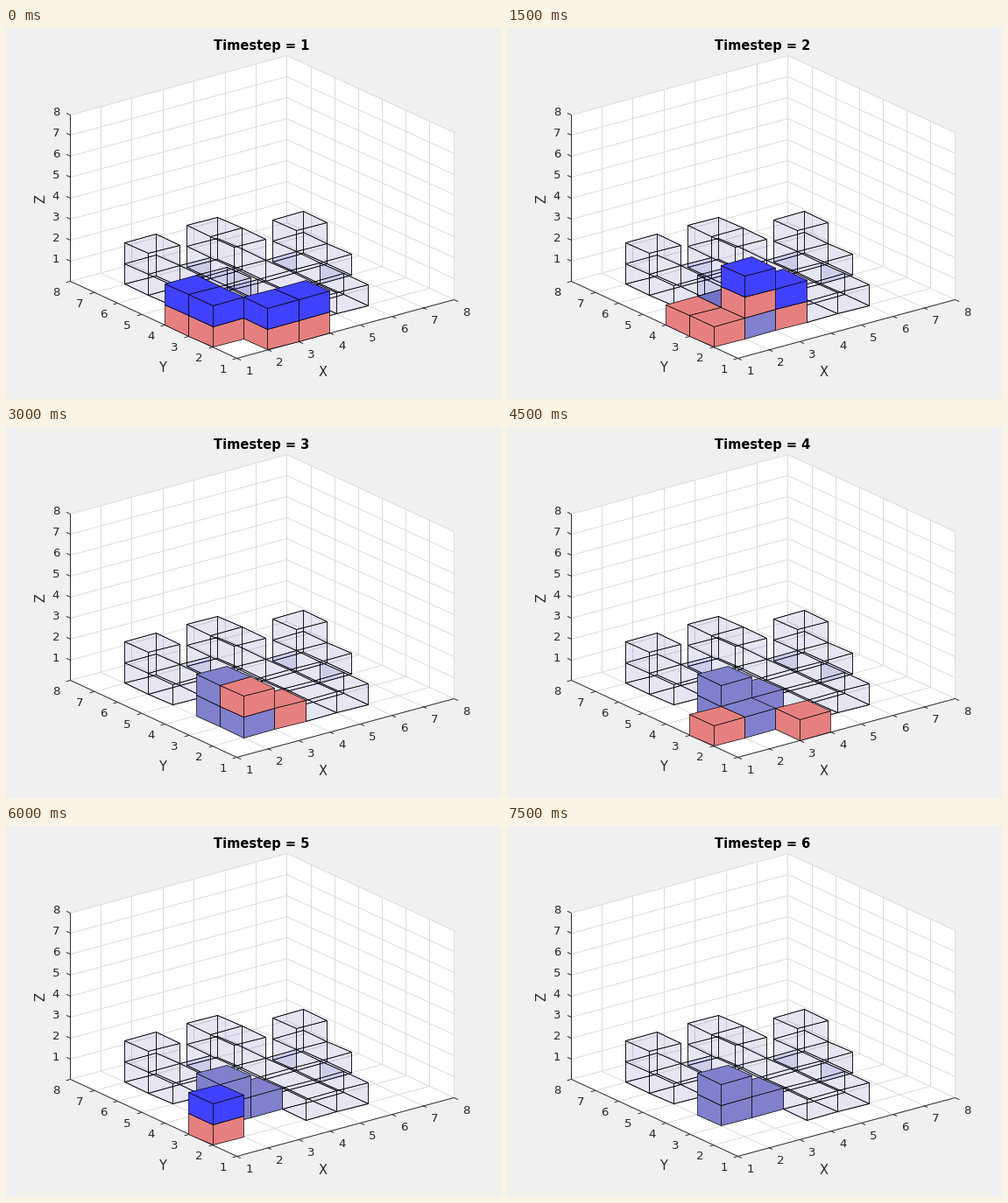
A matplotlib script for the animation above (8000 ms loop, 565 by 424 pixels).

```python
from itertools import product

import numpy as np
import matplotlib.pyplot as plt
from matplotlib.animation import FuncAnimation
from matplotlib.collections import LineCollection, PolyCollection

W, H, DPI = 565, 424, 96
plt.rcParams["font.family"] = "DejaVu Sans"

# Orthographic view from azimuth -37.5, elevation 30, stretched to the axes box
AZ, EL = np.radians(37.5), np.radians(30)
C, S = np.cos(AZ), np.sin(AZ)
SX = 0.775 * W / (C + S) / 7
SY = 0.815 * H / ((C + S) * np.sin(EL) + np.cos(EL))
EX = np.array([SX * C, -SY * S * np.sin(EL) / 7])
EY = np.array([-SX * S, -SY * C * np.sin(EL) / 7])
EZ = np.array([0, -SY * np.cos(EL) / 8])
ORIGIN = np.array([0.13 * W - 0.3 - 7 * EY[0], 0.89 * H + 0.1])

INK = "#262626"
LIGHT = (0, 0, 0.6, 0.1)
DONE = (0.5, 0.5, 0.8, 1)
RED = (0.9, 0.5, 0.5, 1)
BLUE = (0.25, 0.25, 1, 1)
CLEAR = (0, 0, 0, 0)


def project(x, y, z):
    """Screen point, snapped to a pixel centre."""
    p = ORIGIN + (x - 1) * EX + (y - 1) * EY + z * EZ
    return np.floor(p) + 0.5


def path(*points):
    return [project(*p) for p in points]


def block(x, y, nx=1, ny=1, h=1):
    return list(product(range(x, x + nx), range(y, y + ny), range(h)))


# The structure to be built
PLAN = (block(2, 6, h=2) + block(2, 5, nx=2) + block(4, 5, ny=2, h=2)
        + block(4, 2, nx=2, ny=3) + block(6, 4) + block(6, 5, h=2)
        + block(2, 3, h=2) + block(3, 3))

# One letter per timestep: Empty robot, Loaded robot, Placed block
TIMELINE = {
    (1, 2, 0): "LE.EL.",
    (1, 3, 0): "LE....",
    (2, 1, 0): "L.....",
    (3, 1, 0): "L..E..",
    (2, 2, 1): ".LE...",
    (3, 2, 0): ".LE...",
    (2, 2, 0): ".PPP..",
    (2, 3, 0): ".PPPPP",
    (2, 3, 1): "..PPPP",
    (3, 3, 0): "...PPP",
}
STEPS = 6


def cubes_at(step):
    cubes = dict.fromkeys(PLAN, LIGHT)
    for cell, states in TIMELINE.items():
        state = states[step]
        if state == "P":
            cubes[cell] = DONE
        elif state != ".":
            cubes[cell] = RED
        if state == "L":
            x, y, z = cell
            cubes[x, y, z + 1] = BLUE
    return cubes


def neighbour(cell, axis, side):
    n = list(cell)
    n[axis] += 2 * side - 1
    return tuple(n)


def face(cell, axis, side):
    """Corners of the cube face at the given side of one axis."""
    quad = []
    for u, v in ((0, 0), (1, 0), (1, 1), (0, 1)):
        shift = [u, v]
        shift.insert(axis, side)
        quad.append(project(*np.add(cell, shift)))
    return quad


def build(step):
    cubes = cubes_at(step)
    quads, fills = [], []
    # Far cubes first; the camera looks from low x, low y and high z
    for cell in sorted(cubes, key=lambda c: c[2] - c[0] - c[1]):
        color = cubes[cell]
        for back, axis in product((True, False), range(3)):
            side = int(back != (axis == 2))
            shared = neighbour(cell, axis, side) in cubes
            if color == LIGHT and shared or color != LIGHT and back:
                continue
            quads.append(face(cell, axis, side))
            fills.append(CLEAR if back else color)
    return quads, fills


SCENES = [build(s) for s in range(STEPS)]

fig = plt.figure(figsize=(W / DPI, H / DPI), dpi=DPI, facecolor="#f0f0f0")
ax = fig.add_axes([0, 0, 1, 1])
ax.set(xlim=(0, W), ylim=(H, 0))
ax.axis("off")

walls = [
    path((1, 1, 0), (8, 1, 0), (8, 8, 0), (1, 8, 0)),
    path((1, 8, 0), (8, 8, 0), (8, 8, 8), (1, 8, 8)),
    path((8, 1, 0), (8, 8, 0), (8, 8, 8), (8, 1, 8)),
]
ax.add_collection(PolyCollection(walls, facecolors="white", edgecolors="none"))

grid = []
frame = [path((8, 1, 0), (1, 1, 0), (1, 8, 0), (1, 8, 8))]


def label(x, y, text, size=10, color=INK, **kw):
    return ax.text(x, y, text, fontsize=size, color=color,
                   ha="center", va="baseline", **kw)


def add_tick(point, direction, value, dx, dy):
    p = project(*point)
    frame.append([p, p + 5 * direction / np.hypot(*direction)])
    label(p[0] + dx, p[1] + dy, value)


for k in range(1, 9):
    grid += [
        path((k, 1, 0), (k, 8, 0), (k, 8, 8)),
        path((1, k, 0), (8, k, 0), (8, k, 8)),
        path((1, 8, k), (8, 8, k), (8, 1, k)),
    ]
    add_tick((k, 1, 0), -EY, k, 14, 18.5)
    add_tick((1, k, 0), -EX, k, -16, 16.5)
    add_tick((1, 8, k), EY, k, -16.5, 1)

ax.add_collection(LineCollection(grid, colors="#dadada", linewidths=0.7))
ax.add_collection(LineCollection(frame, colors=INK, linewidths=0.7))
label(362, 398.5, "X", 11)
label(178, 393, "Y", 11)
ax.text(40, 195, "Z", fontsize=11, color=INK, rotation=90,
        ha="center", va="center")

cubes = PolyCollection([], edgecolors="black", linewidths=0.5, zorder=3)
ax.add_collection(cubes)
title = label(291.5, 25, "", 11, "black", weight="bold")


def draw(i):
    step = min(i // 3, STEPS - 1)
    quads, fills = SCENES[step]
    cubes.set_verts(quads)
    cubes.set_facecolor(fills)
    title.set_text(f"Timestep = {step + 1}")
    return cubes, title


anim = FuncAnimation(fig, draw, frames=16, interval=500, repeat=True,
                     repeat_delay=0)
plt.show()
```
